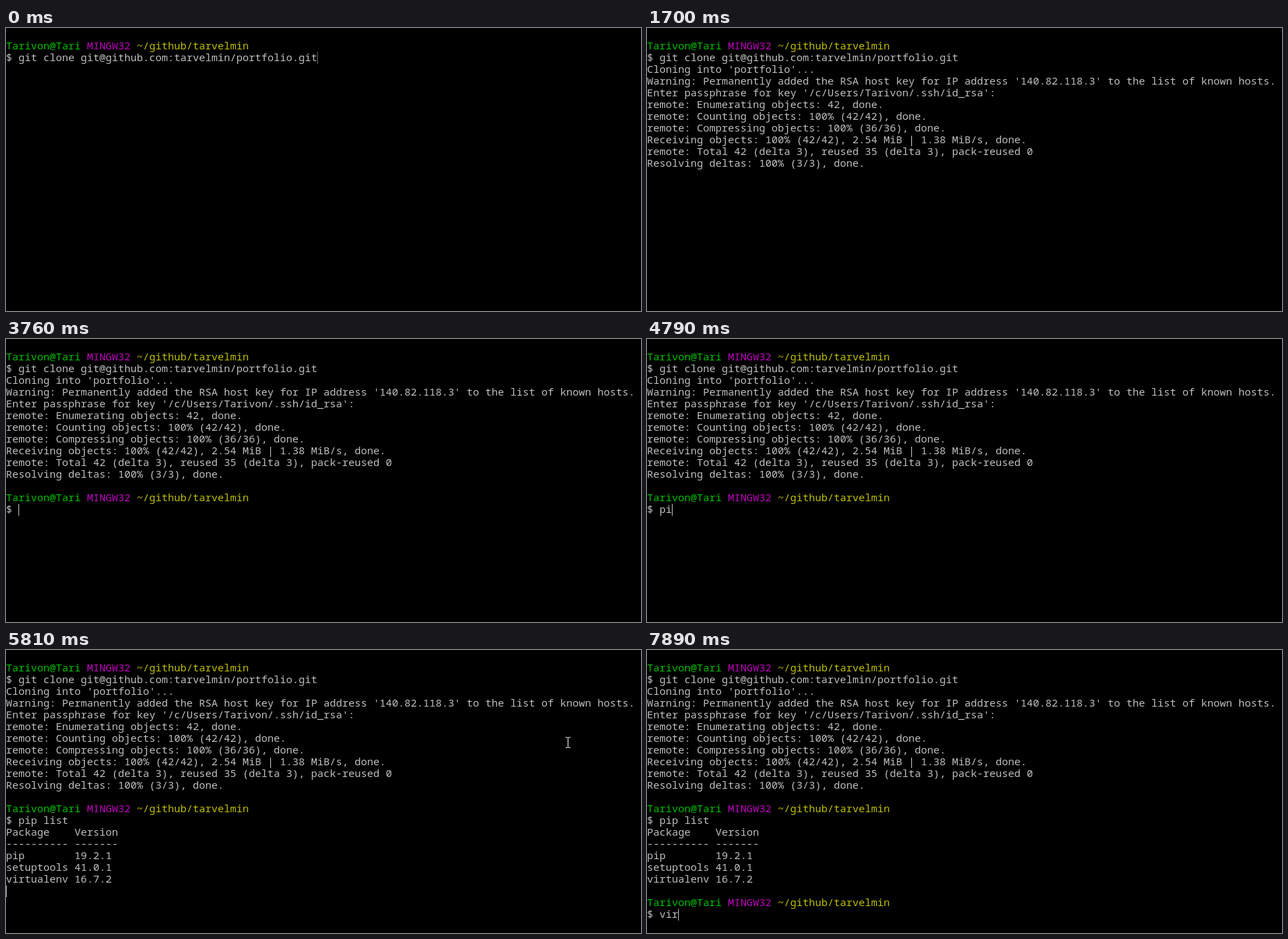
Write an HTML page that moves like this. It is 918 by 410 pixels and loops after 8000 ms.

```html
<!DOCTYPE html>
<html lang="en">
<head>
<meta charset="utf-8">
<title>Terminal</title>
<style>
  html, body { margin: 0; width: 100%; height: 100%; overflow: hidden; background: #000; }
  #screen {
    position: absolute; left: 0; top: 17px; margin: 0;
    font: 15px/17px "Noto Sans Mono", monospace; color: #bfbfbf;
  }
  .user { color: #00bf00; }
  .system { color: #bf00bf; }
  .path { color: #bfbf00; }
  .caret {
    display: inline-block; vertical-align: top; position: relative; top: 1px;
    width: 1px; height: 17px; margin-right: -1px; background: #bfbfbf;
  }
  .dotted { background: repeating-linear-gradient(#bfbfbf 0 1px, #000 1px 2px); }
  #pointer { position: absolute; left: 0; top: 0; fill: none; stroke: #fff; }
</style>
</head>
<body>
<pre id="screen"></pre>
<svg id="pointer" width="7" height="16"><path d="M0 .5h3m1 0h3M3.5 1v14M0 15.5h3m1 0h3"/></svg>
<script>
const LOOP = 8000;
const screenEl = document.getElementById('screen');
const pointerEl = document.getElementById('pointer');

const prompt = '<span class="user">Tarivon@Tari</span> <span class="system">MINGW32</span> ' +
  '<span class="path">~/github/tarvelmin</span>\n$ ';

const cloneLog = `Warning: Permanently added the RSA host key for IP address '140.82.118.3' to the list of known hosts.
Enter passphrase for key '/c/Users/Tarivon/.ssh/id_rsa':
remote: Enumerating objects: 42, done.
remote: Counting objects: 100% (42/42), done.
remote: Compressing objects: 100% (36/36), done.
Receiving objects: 100% (42/42), 2.54 MiB | 1.38 MiB/s, done.
remote: Total 42 (delta 3), reused 35 (delta 3), pack-reused 0
Resolving deltas: 100% (3/3), done.
`;

const packages = `
Package    Version
---------- -------
pip        19.2.1
setuptools 41.0.1
virtualenv 16.7.2
`;

// Each step appends text; caret and pointer keep their value until changed.
const steps = [
  { at: 0, add: prompt + 'git clone git@github.com:tarvelmin/portfolio.git', caret: 'caret dotted', pointer: null },
  { at: 330, pointer: [625, 175] },
  { at: 670, pointer: [510, 76] },
  { at: 1010, add: "\nCloning into 'portfolio'...\n", caret: 'caret', pointer: null },
  { at: 1360, caret: '' },
  { at: 1700, add: cloneLog },
  { at: 2390, caret: 'caret' },
  { at: 2730, caret: '' },
  { at: 3420, caret: 'caret' },
  { at: 3760, add: '\n' + prompt },
  { at: 4450, add: 'p' },
  { at: 4790, add: 'i' },
  { at: 5140, add: 'p list', caret: '' },
  { at: 5490, pointer: [555, 59] },
  { at: 5810, add: packages, caret: 'caret', pointer: [809, 126] },
  { at: 6160, caret: '', pointer: [831, 375] },
  { at: 6500, caret: 'caret', pointer: [717, 336] },
  { at: 6850, pointer: [696, 339] },
  { at: 7190, add: '\n' + prompt },
  { at: 7530, pointer: null },
  { at: 7890, add: 'vir' },
];

let shown = -1;

function render(now) {
  const time = now % LOOP;
  const past = steps.filter(step => step.at <= time);
  if (past.length !== shown) {
    shown = past.length;
    const { caret, pointer } = Object.assign({}, ...past);
    const text = past.map(step => step.add || '').join('');
    screenEl.innerHTML = text + (caret && `<i class="${caret}"></i>`);
    pointerEl.style.display = pointer ? 'block' : 'none';
    if (pointer) pointerEl.style.transform = `translate(${pointer[0]}px, ${pointer[1]}px)`;
  }
}

const start = performance.now();
function tick() {
  render(performance.now() - start);
  requestAnimationFrame(tick);
}
tick();
</script>
</body>
</html>
```
